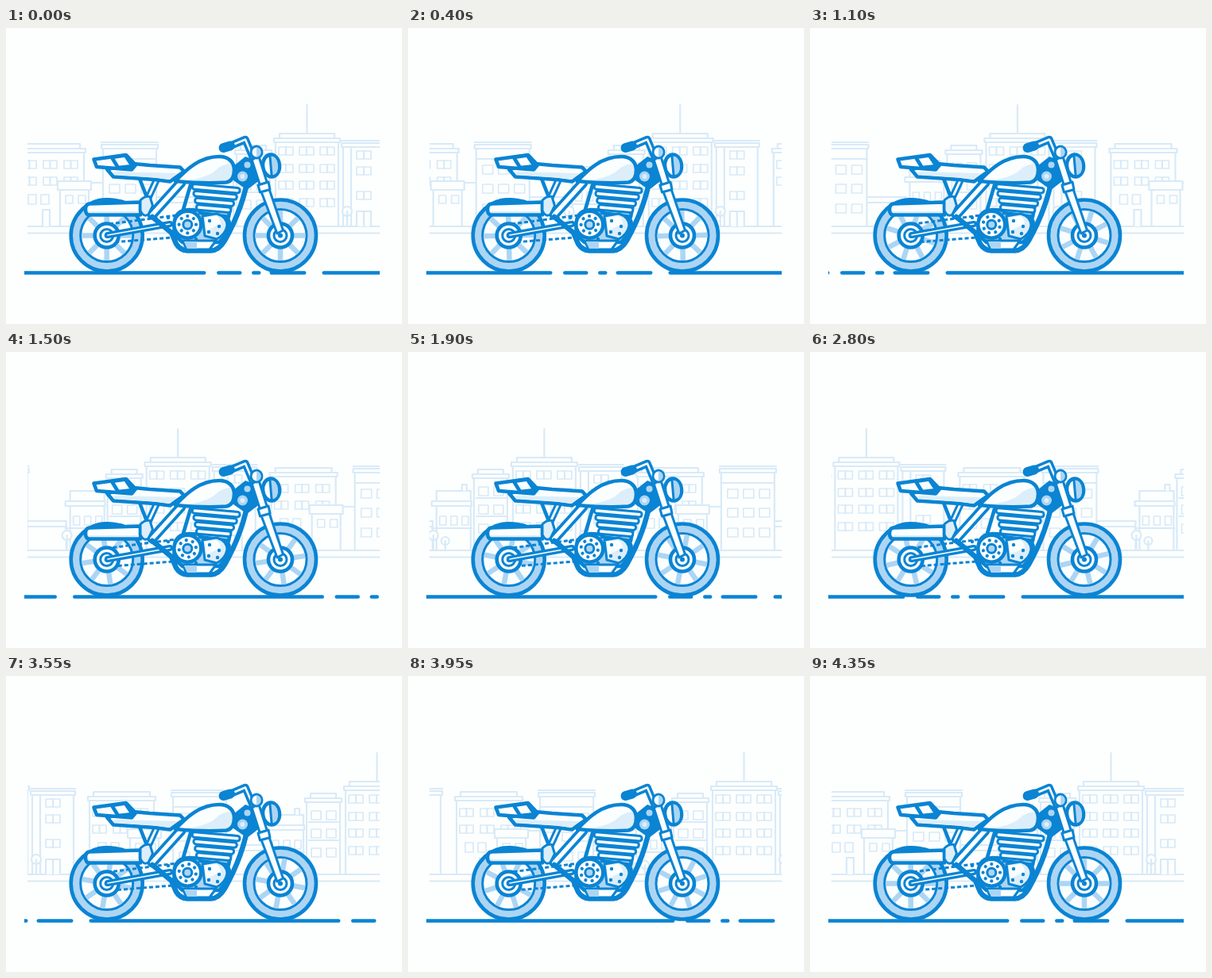
Recreate the animation shown at these times as an HTML page. Size 498x373 px, loop 4.4 s.

```html
<!DOCTYPE html>
<html lang="en">
<head>
<meta charset="utf-8">
<title>Motorcycle ride</title>
<style>
  html, body { margin: 0; width: 100%; height: 100%; overflow: hidden; background: #fdfffe; }
  svg { display: block; width: 498px; height: 373px; }
  .o { stroke: #0a84d3; stroke-width: 4.6; fill: #fbfeff; }
  .thin { stroke-width: 3; }
  .n { fill: none; }
  .pale { fill: #dceefa; }
  .mid { fill: #acd5f4; }
  .blue { fill: #0a84d3; }
  .white { fill: #fbfeff; }
</style>
</head>
<body>
<svg viewBox="0 0 498 373" stroke-linejoin="round" stroke-linecap="round">
  <defs>
    <clipPath id="view"><rect x="27" y="90" width="443" height="175"/></clipPath>
    <clipPath id="lane"><rect x="23" y="300" width="447" height="16"/></clipPath>
  </defs>

  <g clip-path="url(#view)" fill="#fdfffe" stroke="#d8eaf8" stroke-width="2.2">
    <path d="M27 250H470M27 258.5H470"/>
    <g id="city"></g>
  </g>
  <g clip-path="url(#lane)"><g id="road" stroke="#0a84d3" stroke-width="4.6"></g></g>

  <g id="wheels"></g>
  <path class="blue" d="M94 227Q108 214 127 214Q148 214 162 224Z"/>

  <!-- chain and swing arm -->
  <g class="o n thin" stroke-linecap="butt">
    <path class="chain" d="M130 247L222 235"/>
    <path class="chain" d="M222 263L134 270"/>
  </g>
  <g id="hubs"></g>
  <g id="arm"></g>

  <!-- frame -->
  <path class="o n" d="M168 190L177 213M232 198L222 232"/>
  <g id="tubes"></g>
  <path class="o n" style="stroke-width:6.5" d="M305 184C301 211 290 241 275 268Q268 280 258 280.5H228Q219 280 214 272L208 258L184 238"/>

  <!-- engine -->
  <path class="o mid" d="M213 238Q218 229 230 229L270 231Q281 237 281 249Q279 260 268 270H222L211 260Z"/>
  <path class="o white thin" d="M222 268H264L256 279H227Z"/>
  <path class="mid" d="M224 269H240V278H228Z"/>
  <path class="o mid" d="M238 198L287 202L280 238L244 233Z"/>
  <g id="fins"></g>
  <path class="o pale thin" d="M247 237L265 234Q278 238 278 249Q276 260 265 266L250 262Z"/>
  <path class="white" d="M250 239L264 237Q270 240 270 247L252 255Z"/>
  <g id="bolts" class="blue"></g>
  <g id="sprocket"></g>

  <!-- exhaust and side cover -->
  <path class="o" d="M105 221.5L169 219.5V235.5H104.5Q100 235 100 228.5Q100 222 105 221.5Z"/>
  <path class="pale" d="M103 231H167V233H104Z"/>
  <path class="o pale thin" d="M169 217Q175 211 181 212.5L184.5 224L179 235Q173 239 169 230Z"/>

  <!-- seat and tail -->
  <path class="o" d="M127 178L160 171L181 173L219 175.5L224 181L206 193.5L187 191L135 187.5Z"/>
  <path class="pale" d="M134 181L216 183L206 191L188 188.5L137 185Z"/>
  <path class="o" d="M110.5 165.5L151 160L163 172.5L158 178.5L114 175Z"/>
  <path class="o" d="M133 163L141 176L159 174L150 160.5Z"/>

  <!-- gusset and tank -->
  <path class="blue" d="M286 174L301 162L314 167L320 191L303 204L286 192Z"/>
  <circle class="mid" cx="297.5" cy="187" r="6.5"/>
  <circle class="pale" cx="297.5" cy="187" r="3"/>
  <circle class="mid" cx="303.5" cy="172.5" r="4"/>
  <path class="white" d="M213 193C227 178 244 162 268 162C280 162 287 169 287 179C287 188 284 193 277 194.5Q250 196.5 213 193Z"/>
  <path class="pale" d="M218 193Q252 190 264 179Q272 171 284 171L287 180L278 194Q250 196 218 193Z"/>
  <path class="o n" d="M213 193C227 178 244 162 268 162C280 162 287 169 287 179C287 188 284 193 277 194.5Q250 196.5 213 193Z"/>

  <!-- fork, headlight and bars -->
  <g transform="rotate(-5 334 173.5)">
    <ellipse class="o" cx="333.5" cy="173.5" rx="10.5" ry="14"/>
    <path class="mid" d="M334 161.5Q342 162 342 173.5Q342 185 334 185.5Z"/>
    <path class="o n thin" d="M333 160V187"/>
  </g>
  <path class="o thin" d="M308.5 164L318 162L329 197L320 200Z"/>
  <path class="o thin" d="M320.5 205L331 203L348.5 255L341 259Z"/>
  <path class="o thin" d="M317 198L330 194L332 203.5L319.5 207Z"/>
  <g id="bars"></g>
  <ellipse class="o thin white" cx="315" cy="156.5" rx="7" ry="7.5"/>
  <path class="mid" d="M315 150.5Q320.5 151 320.5 156.5Q320.5 162 315 162.5Z"/>
</svg>

<script>
const NS = 'http://www.w3.org/2000/svg';
const $ = id => document.getElementById(id);
const LOOP = 4400, STEP = 50, CITY = 479, ROAD = 462, TURN = 1170;

function add(parent, tag, attrs) {
  const el = document.createElementNS(NS, tag);
  for (const k in attrs) el.setAttribute(k, attrs[k]);
  return parent.appendChild(el);
}
const box = (p, x, y, width, height, more) => add(p, 'rect', { x, y, width, height, ...more });
const line = (p, d, more) => add(p, 'path', { d, ...more });
const ring = (p, cx, cy, r, more) => add(p, 'circle', { cx, cy, r, ...more });

// White core inside a blue stroke
function tube(p, d, outer, inner) {
  line(p, d, { fill: 'none', stroke: '#0a84d3', 'stroke-width': outer });
  line(p, d, { fill: 'none', stroke: '#fbfeff', 'stroke-width': inner });
}

// Windows: columns of x positions against rows of y positions
function windows(g, cols, rows, w, h) {
  for (const x of cols) for (const y of rows) {
    box(g, x, y, w, h, { 'stroke-width': 1.7 });
    if (w > 15) line(g, `M${x + w / 2} ${y}v${h}`);
  }
}
function block(g, x, y, w, roof) {
  box(g, x + 2, y + 8, w - 4, 242 - y);
  box(g, x, y + 3, w, 5);
  if (roof) box(g, x + 7, y - 3, w - 14, 6);
  else line(g, `M${x} ${y}h${w}`);
}

function drawCity(g) {
  // low walls and small houses
  box(g, 98, 195, 27, 55);
  box(g, 188, 213, 50, 37);
  line(g, 'M188 220h50');
  box(g, 243, 175, 43, 75);
  box(g, 237, 188, 50, 6);
  windows(g, [247, 261, 275], [207], 8, 11);
  line(g, 'M237 222h50M275 175v-8h6v8');

  block(g, 15, 149, 85, true);
  windows(g, [21, 47, 73], [167, 188], 17, 10);
  windows(g, [28, 44], [210], 10, 12);
  box(g, 68, 204, 36, 46);
  box(g, 65, 193, 42, 11);
  windows(g, [75, 91], [211], 9, 10);
  line(g, 'M46 250v-21h9v21');

  block(g, 120, 144, 71, false);
  line(g, 'M123 165h65');
  windows(g, [130, 150, 170], [173, 197, 222], 13, 11);

  block(g, 288, 151, 46, true);
  windows(g, [296, 315], [170, 193, 217], 12, 11);
  line(g, 'M293 184h18m1 0h18M293 207h18m1 0h18');

  block(g, 337, 136, 83, true);
  windows(g, [343, 369, 395], [150, 172, 193, 215], 18, 10);
  line(g, 'M378.5 132V97');

  block(g, 422, 142, 56, false);
  line(g, 'M434 150V250');
  windows(g, [441], [155, 175, 206], 18, 10);
  line(g, 'M441 250v-19h18v19M450 231v19');

  for (const [x, y, r] of [[239, 231, 6], [254, 238, 5], [429, 231, 6]]) {
    ring(g, x, y, r);
    line(g, `M${x} ${y}V250`);
  }
}
for (const k of [-1, 0, 1]) drawCity(add($('city'), 'g', { transform: `translate(${k * CITY})` }));

// Road dashes, round caps included in each span
const spans = [[265, 296.5], [309, 320.5], [331.5, 377.5], [397.5, 713.5]];
for (let k = -2; k < 3; k++)
  for (const [a, b] of spans)
    line($('road'), `M${a + k * ROAD + 2.3} 308.5H${b + k * ROAD - 2.3}`);

const spinning = [];
for (const x of [126.7, 345]) {
  const y = 261.5, g = $('wheels');
  ring(g, x, y, 45, { class: 'o mid' });
  ring(g, x, y, 33, { class: 'o thin' });
  const spokes = add(g, 'g', { stroke: '#acd5f4', 'stroke-width': 6.5, 'stroke-linecap': 'butt' });
  for (let a = 0; a < 360; a += 45)
    line(spokes, `M${x} ${y - 14}v-17.5`, { transform: `rotate(${a} ${x} ${y})` });
  spinning.push([spokes, x, y]);

  const hub = $('hubs');
  ring(hub, x, y, 15, { class: 'o' });
  ring(hub, x, y, 8, { class: 'o thin' });
  ring(hub, x, y, 3, { class: 'blue' });
}

tube($('arm'), 'M128 261L206 247', 8, 1.5);
tube($('tubes'), 'M190 190L179 214', 9, 3);
tube($('tubes'), 'M220 195L184 235', 13, 5.5);
tube($('bars'), 'M282 148.5L301 140.5L310 162', 9.5, 2.5);
line($('bars'), 'M273.5 151L282 148.5', { stroke: '#0a84d3', 'stroke-width': 12 });

for (let i = 0; i < 4; i++)
  box($('fins'), 233 + i * 2.5, 199 + i * 8.5, 60 - i * 5.5, 6.5,
    { rx: 3, class: 'o thin', transform: 'rotate(5 262 215)' });

for (const [x, y] of [[256, 243], [268, 250], [266, 259], [255, 257], [239, 266], [204, 239]])
  ring($('bolts'), x, y, 2.2);

const gear = $('sprocket');
ring(gear, 228.3, 247.7, 17, { class: 'o' });
const holes = add(gear, 'g', { class: 'blue' });
for (let a = 0; a < 360; a += 45)
  ring(holes, 228.3, 237, 2.1, { transform: `rotate(${a} 228.3 247.7)` });
ring(gear, 228.3, 247.7, 5.5, { class: 'o mid thin' });
spinning.push([holes, 228.3, 247.7]);

const chains = document.querySelectorAll('.chain');
chains.forEach(c => c.setAttribute('stroke-dasharray', '5 3'));

// Distance travelled (road pixels) at each time
const path = [[0, 0], [400, 70], [1100, 227], [1900, 400], [2800, 594], [3550, 755], [4350, 925]];
function travel(t) {
  let i = 1;
  while (i < path.length - 1 && t > path[i][0]) i++;
  const [t0, d0] = path[i - 1], [t1, d1] = path[i];
  return d0 + (d1 - d0) * (t - t0) / (t1 - t0);
}

function draw(now) {
  const t = Math.floor(now % LOOP / STEP) * STEP;
  const d = travel(t), p = d / 925;
  $('city').setAttribute('transform', `translate(${-p * CITY})`);
  $('road').setAttribute('transform', `translate(${-(d % ROAD)})`);
  for (const [el, x, y] of spinning) el.setAttribute('transform', `rotate(${p * TURN} ${x} ${y})`);
  chains.forEach(c => c.setAttribute('stroke-dashoffset', -p * 320));
}

const start = performance.now();
function tick() {
  draw(performance.now() - start);
  requestAnimationFrame(tick);
}
tick();
</script>
</body>
</html>
```
